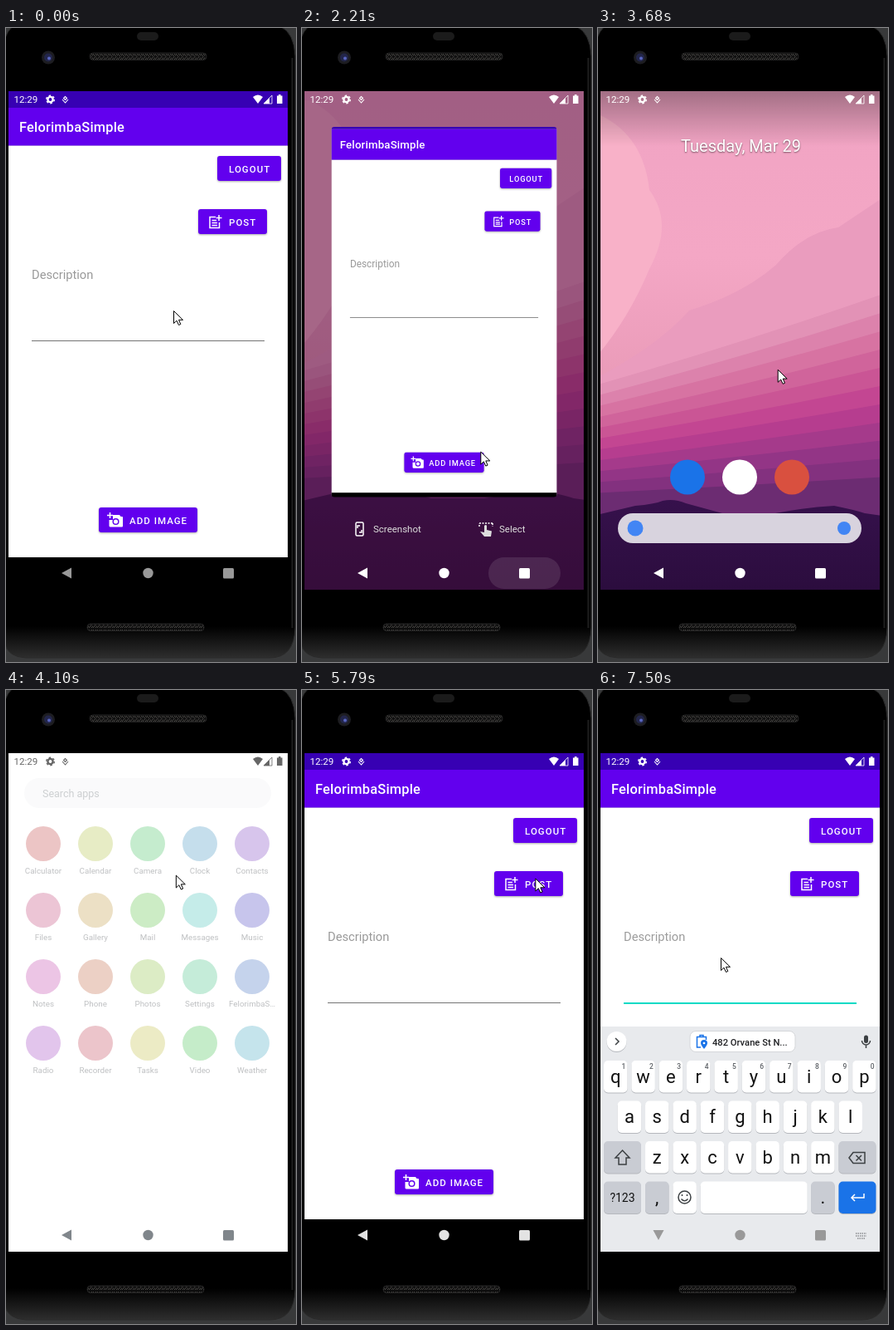
Write an HTML page that moves like this. It is 350 px wide and 763 px high and loops after 8 s.

```html
<!DOCTYPE html>
<html lang="en">
<head>
<meta charset="utf-8">
<title>Phone demo</title>
<style>
  html, body { margin: 0; width: 100%; height: 100%; overflow: hidden; background: #000; }
  body { position: relative; font-family: Roboto, sans-serif; }
  svg { position: absolute; display: block; }
  .stage { left: 0; top: 0; width: 350px; height: 763px; }
  #screen { position: absolute; left: 3px; top: 76px; width: 337px; height: 600px; overflow: hidden; background: #000; }
  #screen > svg { left: 0; top: 0; width: 337px; height: 600px; transform-origin: 0 0; }
  #wall { overflow: visible; }
  .btn { fill: #6200ee; filter: drop-shadow(0 1px 1px #0005); }
  .btnText { fill: #fff; font-size: 11.5px; font-weight: 500; letter-spacing: 1.03px; }
  .line { fill: none; stroke: #fff; stroke-width: 1.5; }
  .dark { fill: none; stroke: #3c4043; stroke-width: 1.5; }
  .ink { fill: currentColor; }
  .ring { fill: none; stroke: currentColor; }
  .mid { text-anchor: middle; }
  .key { filter: drop-shadow(0 1px 0 #b5b8bd); }
  #back { transform-box: fill-box; transform-origin: center; }

  /* All motion is paused and read off the clock in --t (ms). */
  .anim { animation: 8s linear calc(var(--t, 0) * -1ms) infinite paused; }

  #cursor { animation-name: cursor; }
  @keyframes cursor {
    0% { translate: 202px 340px; }
    5%, 10% { translate: 185px 298px; }
    14.8% { translate: 193px 627px; }
    18.1% { translate: 169px 671px; }
    21.4% { translate: 247px 656px; }
    24.7% { translate: 260px 652px; }
    27.9% { translate: 216px 513px; }
    36.2% { translate: 125px 82px; }
    42.8%, 44.4% { translate: 223px 434px; }
    46% { translate: 217px 414px; }
    50% { translate: 195px 200px; }
    57.5%, 60.5% { translate: 269px 370px; }
    64.1% { translate: 245px 423px; }
    70.7% { translate: 280px 209px; }
    75.7% { translate: 284px 261px; }
    79% { translate: 230px 480px; }
    82.2% { translate: 211px 500px; }
    83.9% { translate: 155px 342px; }
    85.5%, 100% { translate: 148px 322px; }
  }

  #app { animation-name: app; }
  @keyframes app {
    0%, 22.4%, 66.6%, 100% { transform: none; clip-path: inset(0); }
    22.5% { transform: translate(6px, 6px) scale(.965); }
    27.9% { transform: translate(32px, 29.6px) scale(.81); }
    29.6% { transform: translate(39px, 30px) scale(.772); }
    34.5%, 66.5% { transform: translate(39px, -460px) scale(.772); }
    22.5%, 66.5% { clip-path: inset(16.5px 0 32.4px round 5px); }
  }

  #wall { animation-name: zoom; }
  @keyframes zoom {
    0%, 36.3% { transform: translate(6px, -18px); }
    42.7%, 100% { transform: none; }
  }
  #dim { animation-name: dim; }
  @keyframes dim { 0%, 36.3% { opacity: .46; } 42.7%, 100% { opacity: 0; } }
  #home { animation-name: home; }
  @keyframes home { 0%, 38% { opacity: 0; } 42.7%, 46.5% { opacity: 1; } 49%, 100% { opacity: 0; } }
  #actions { animation-name: actions; }
  @keyframes actions { 0%, 24.7% { opacity: 0; } 27.9%, 28.5% { opacity: 1; } 29%, 100% { opacity: 0; } }
  #ripple { animation-name: ripple; }
  @keyframes ripple { 0%, 22.4% { opacity: 0; } 22.5% { opacity: .14; } 28.5% { opacity: .1; } 29%, 100% { opacity: 0; } }

  #drawer { animation-name: drawer; }
  @keyframes drawer {
    0%, 46.5% { transform: translateY(600px); animation-timing-function: ease-out; }
    51%, 66.5% { transform: none; }
    66.6%, 100% { transform: translateY(600px); }
  }
  #apps { animation-name: apps; }
  @keyframes apps { 0%, 49% { opacity: 0; } 54%, 100% { opacity: 1; } }
  #launch { animation-name: launch; }
  @keyframes launch {
    0%, 60% { transform: translate(262px, 235px) scale(.1); opacity: 0; }
    60.1% { transform: translate(220px, 200px) scale(.25); opacity: 1; }
    64.1% { transform: translate(3px, 4px) scale(.982); }
    65.8%, 100% { transform: none; opacity: 1; }
  }

  #status { animation-name: status; }
  @keyframes status {
    0%, 49% { color: #fff; }
    51%, 60.8% { color: #666; }
    64.1% { color: #e0dff0; }
    65.8%, 100% { color: #fff; }
  }
  #nav { animation-name: nav; }
  @keyframes nav {
    0%, 22.4% { color: #999; }
    22.5%, 49% { color: #fff; }
    51%, 60.8% { color: #80868b; }
    64.1%, 71% { color: #eee; }
    82%, 100% { color: #999; }
  }

  #hint { animation-name: hint; }
  @keyframes hint { 0%, 86.4% { fill: #999; } 86.5%, 88% { fill: #757575; } 88.1%, 100% { fill: #9c9c9c; } }
  #focus { animation-name: focus; }
  @keyframes focus { 0%, 86.4% { opacity: 0; } 86.5%, 100% { opacity: 1; } }
  #caret { animation-name: caret; }
  @keyframes caret { 0%, 86.4% { opacity: 0; } 86.5%, 93% { opacity: 1; } 93.1%, 100% { opacity: 0; } }
  #keyboard { animation-name: rise; }
  @keyframes rise {
    0%, 88% { transform: translateY(271px); animation-timing-function: ease-out; }
    93.7%, 100% { transform: none; }
  }
  #back { animation-name: turn; }
  @keyframes turn { 0%, 89.5% { transform: none; } 89.6%, 100% { transform: rotate(-90deg); } }
</style>
</head>
<body>

<svg class="stage" viewBox="0 0 350 763">
  <defs>
    <linearGradient id="body" x2="0" y2="1">
      <stop offset="0"/><stop offset=".95"/><stop offset="1" stop-color="#2e2e2e"/>
    </linearGradient>
    <pattern id="mesh" width="5" height="9" y="30" patternUnits="userSpaceOnUse">
      <rect width="5" height="9" fill="#0d0d0d"/>
      <path d="M0 1L3 4.500L0 8M3 1L6 4.500L3 8" fill="none" stroke="#4a4846"/>
    </pattern>
  </defs>
  <rect width="350" height="763" fill="#38393a"/>
  <path d="M8 -2H331Q348 6 349 34V722Q348 758 318 758H24Q2 757 -2 740V14Q2 3 8 -2Z" fill="url(#body)" stroke="#2a2a2a"/>
  <path d="M345.500 36V722" stroke="#1e1e1e" stroke-width="2"/>
  <rect x="158" y="5" width="26" height="10" rx="5" fill="#1b1b1b"/>
  <circle cx="51" cy="35.500" r="8" fill="#1d1d21"/>
  <circle cx="51" cy="35.500" r="5" fill="#23264a"/>
  <circle cx="52" cy="36.500" r="2" fill="#5865c0"/>
  <rect x="101" y="30" width="141" height="8.500" rx="4" fill="url(#mesh)" stroke="#252525"/>
  <rect x="98" y="717" width="141" height="8.500" rx="4" fill="url(#mesh)" stroke="#252525"/>
</svg>

<div id="screen">
  <svg id="wall" class="anim" viewBox="3 76 337 600">
    <defs>
      <linearGradient id="sky" x2="0" y2="1">
        <stop offset="0" stop-color="#f0a3c3"/><stop offset=".5" stop-color="#f4a7c5"/>
        <stop offset="1" stop-color="#e595b2"/>
      </linearGradient>
      <linearGradient id="hill" x2="0" y2="1">
        <stop offset="0" stop-color="#36114c"/><stop offset="1" stop-color="#270b38"/>
      </linearGradient>
    </defs>
    <rect x="-10" y="50" width="360" height="450" fill="url(#sky)"/>
    <path d="M-10 105H3Q55 130 62 195Q92 235 62 290Q35 355 -10 405Z" fill="#f8b1c8"/>
    <path d="M-10 425Q70 385 110 340Q175 320 215 285Q250 245 290 240L350 200V450H-10Z" fill="#ea9cbe"/>
    <g id="bands"></g>
    <path d="M-10 588L45 575Q68 573 78 569Q92 566 106 572L150 584Q200 584 214 584Q250 577 285 575Q310 580 322 584L350 588V720H-10Z" fill="url(#hill)"/>
  </svg>

  <svg id="dim" class="anim" viewBox="3 76 337 600"><rect x="3" y="76" width="337" height="600" fill="#440e3a"/></svg>

  <svg id="home" class="anim" viewBox="3 76 337 600">
    <defs>
      <linearGradient id="shade" x2="0" y2="1">
        <stop offset="0" stop-opacity=".32"/><stop offset="1" stop-opacity="0"/>
      </linearGradient>
    </defs>
    <rect x="3" y="76" width="337" height="66" fill="url(#shade)"/>
    <text class="mid" x="172.500" y="149" font-size="20" fill="#fff" style="text-shadow:0 1px 2px #0008">Tuesday, Mar 29</text>
    <circle cx="108" cy="540.500" r="21" fill="#1a73e8"/>
    <circle cx="171" cy="540.500" r="21" fill="#fff"/>
    <circle cx="234" cy="540.500" r="21" fill="#d9503f"/>
    <rect x="24" y="584" width="294" height="36" rx="18" fill="#d8d3de"/>
    <circle cx="45" cy="602" r="9.500" fill="#4285f4"/>
    <circle cx="297" cy="602" r="8" fill="#4285f4"/>
  </svg>

  <svg id="drawer" class="anim" viewBox="3 76 337 600">
    <rect x="3" y="76" width="337" height="620" fill="#fff"/>
    <g id="apps" class="anim">
      <rect x="22" y="106" width="298" height="36" rx="18" fill="#f1f3f4"/>
      <text x="44" y="128.500" font-size="12.500" fill="#80868b">Search apps</text>
      <g id="grid"></g>
    </g>
  </svg>

  <svg id="actions" class="anim" viewBox="3 76 337 600" fill="#ddd" font-size="11.500">
    <rect x="65" y="595" width="9" height="16" rx="1.500" class="line"/>
    <path d="M67 602V599H70M72 604V607H69" class="line"/>
    <text x="86" y="607">Screenshot</text>
    <path d="M214 596H230M214 600V596M230 596V600" class="line" stroke-dasharray="2 1.500"/>
    <path d="M220 599Q222 597 223 599V604L229 605.500L228 612H220L215 606L220 607Z"/>
    <text x="238" y="607">Select</text>
  </svg>

  <svg id="launch" class="anim" viewBox="3 76 337 600">
    <rect x="3" y="76" width="337" height="600" fill="#fff"/>
    <rect x="3" y="76" width="337" height="20" fill="#3700b3"/>
    <rect x="3" y="637" width="337" height="39"/>
  </svg>

  <svg id="app" class="anim" viewBox="3 76 337 600">
    <rect x="3" y="76" width="337" height="600" fill="#fff"/>
    <rect x="3" y="96" width="337" height="45.500" fill="#6200ee" style="filter:drop-shadow(0 .5px .5px #0005)"/>
    <rect x="3" y="76" width="337" height="20" fill="#3700b3"/>
    <rect x="3" y="637" width="337" height="39"/>
    <text x="16" y="125" font-size="16.400" font-weight="500" letter-spacing=".2" fill="#fff">FelorimbaSimple</text>

    <rect class="btn" x="255" y="154" width="77" height="30" rx="3"/>
    <text class="btnText" x="269" y="174">LOGOUT</text>

    <rect class="btn" x="232" y="218" width="83" height="30" rx="3"/>
    <path class="line" d="M253 227.500H246V240.500H257.500V234M248.500 231.500H254M248.500 234.500H255M248.500 237.500H255M257 225V232M253.500 228.500H260.500"/>
    <text class="btnText" x="269" y="238">POST</text>

    <text id="hint" class="anim" x="31" y="302" font-size="14.700">Description</text>
    <rect x="31" y="376" width="281" height="1" fill="#737373"/>
    <rect id="focus" class="anim" x="31" y="376" width="281" height="2" fill="#03dac5"/>
    <rect id="caret" class="anim" x="31" y="287" width="1" height="19" fill="#555"/>

    <rect class="btn" x="112" y="577" width="119" height="30" rx="3"/>
    <path d="M129 586H137L138.500 588H140Q141 588 141 589V599Q141 600.500 140 600.500H126Q124.500 600.500 124.500 599V592H129Z" fill="#fff"/>
    <circle cx="132.500" cy="594" r="3.300" fill="#fff" stroke="#6200ee" stroke-width="1.500"/>
    <path class="line" d="M125.500 583V590M122 586.500H129"/>
    <text class="btnText" x="149" y="597">ADD IMAGE</text>
  </svg>

  <svg id="keyboard" class="anim" viewBox="3 76 337 600">
    <rect x="3" y="405" width="337" height="271" fill="#e8eaed"/>
    <circle class="key" cx="22.500" cy="423" r="12" fill="#fff"/>
    <path class="dark" d="M21 419L25 423L21 427"/>
    <rect x="111" y="410.500" width="127" height="25" rx="7" fill="#fff" stroke="#d5d7da"/>
    <path d="M124 430H119.500V417.500H130.500V421M123 417.500V415.500H127V417.500" class="line" style="stroke:#1a73e8"/>
    <path d="M128 432Q124 427 124 425A4 4 0 0 1 132 425Q132 427 128 432Z" fill="#1a73e8"/>
    <circle cx="128" cy="425" r="1.300" fill="#fff"/>
    <text x="138" y="428" font-size="11.200" font-weight="500" fill="#202124">482 Orvane St N...</text>
    <rect x="321" y="415.500" width="5" height="9.500" rx="2.500" fill="#3c4043"/>
    <path class="dark" d="M318.500 422A5 5 0 0 0 328.500 422M323.500 427V431"/>
    <g id="keys"></g>
    <path class="dark" d="M29.500 554L38 563H34V571H25V563H21Z"/>
    <path class="dark" d="M303 563L308 556.500H322V569.500H308ZM311.500 560L318 566.500M318 560L311.500 566.500"/>
    <g class="dark"><circle cx="104.500" cy="610.500" r="7.500"/><path d="M100.500 612.500Q104.500 617 108.500 612.500M101.500 607V609M107.500 607V609"/></g>
    <path class="line" d="M321 606V611H306M310 607L306 611L310 615"/>
    <path d="M311 654H324M311 657H324M313 660H322" stroke="#8a8d91" stroke-width="1.500" stroke-dasharray="1.500 1"/>
  </svg>

  <svg viewBox="3 76 337 600">
    <g id="status" class="anim ink">
      <text x="9.500" y="90" font-size="11.600">12:29</text>
      <circle class="ring" cx="53.500" cy="86" r="3.100" stroke-width="2.400"/>
      <circle class="ring" cx="53.500" cy="86" r="4.800" stroke-width="1.400" stroke-dasharray="2.500 2.530"/>
      <path class="ring" d="M68 86L71.500 90L75 86M71.500 82.500L69.500 84.500L71.500 86.500L73.500 84.500Z" stroke-width="1.100"/>
      <path d="M298 83Q304 78 310 83L304 91Z"/>
      <path d="M318 84V91H311Z"/><path class="ring" d="M321 81V91H311Z" stroke-width=".8"/>
      <path d="M327 81.500H329V80H331.500V81.500H333.500V91H327Z"/>
    </g>
    <rect id="ripple" class="anim" x="225" y="637" width="87" height="38" rx="19" fill="#fff"/>
    <g id="nav" class="anim ink">
      <path id="back" class="anim" d="M67 656L79 649.500V662.500Z"/>
      <circle cx="171.500" cy="656" r="6.200"/>
      <rect x="262" y="650" width="13" height="12.500" rx="1.500"/>
    </g>
  </svg>
</div>

<svg class="stage" viewBox="0 0 350 763">
  <path id="cursor" class="anim" d="M.5 .5V15.500L4 12.200L6.500 17.500L8.800 16.500L6.500 11.300H11.500Z" fill="#fff" stroke="#000"/>
</svg>

<script>
const fill = (id, html) => { document.getElementById(id).innerHTML = html; };
const repeat = (count, fn) => Array.from({ length: count }, (_, i) => fn(i)).join('');

// Cloud bands: flatter, darker and more violet towards the horizon
const BANDS = 11;
fill('bands', repeat(BANDS, i => {
  const p = i / (BANDS - 1), left = 432 + 128 * p, right = 318 + 222 * p;
  const bend = left * .55 + right * .45;
  return `<path d="M-10 ${left}Q170 ${bend} 350 ${right}V600H-10Z"
    fill="hsl(${333 - 38 * p * p} ${58 - 14 * p}% ${73 - 42 * p}%)"/>`;
}));

// App drawer grid
const names = ('Calculator Calendar Camera Clock Contacts Files Gallery Mail Messages Music ' +
  'Notes Phone Photos Settings FelorimbaS… Radio Recorder Tasks Video Weather').split(' ');
fill('grid', repeat(names.length, i => {
  const x = 45 + i % 5 * 63, y = 185 + Math.floor(i / 5) * 80;
  return `<circle cx="${x}" cy="${y}" r="21" fill="hsl(${i * 67 % 360} 50% 62%)"/>
    <text class="mid" x="${x}" y="${y + 36}" font-size="9.8" fill="#5f6368">${names[i]}</text>`;
}));

// Keyboard: rows and columns on a fixed pitch
const PITCH = 33.35, GREY = '#c9ccd3';
const rowY = r => 446 + r * 48.5;
const key = (r, x, w, label = '', color = '#fff', size = 22) =>
  `<rect class="key" x="${x}" y="${rowY(r)}" width="${w}" height="38.5" rx="5" fill="${color}"/>
   <text class="mid" x="${x + w / 2}" y="${rowY(r) + 19.5 + size * .33}" font-size="${size}" fill="#111">${label}</text>`;
const col = c => 7 + c * PITCH;
const small = (r, c, label, color) => key(r, col(c), 28.5, label, color);
const wide = (r, c, label, color) => key(r, col(c), 45, label, color, 14);
const letters = ['qwertyuiop', 'asdfghjkl', 'zxcvbnm'];
fill('keys',
  letters.map((row, r) => repeat(row.length, i => small(r, (10 - row.length) / 2 + i, row[i]))).join('') +
  repeat(10, i => `<text class="mid" x="${col(i) + 24}" y="456" font-size="8.5" font-weight="500" fill="#5f6368">${(i + 1) % 10}</text>`) +
  wide(2, 0, '', GREY) + wide(2, 8.5, '', GREY) +
  wide(3, 0, '?123', GREY) + small(3, 1.5, ',', GREY) + small(3, 2.5) + key(3, col(3.5), 129) +
  small(3, 7.5, '.', GREY) + wide(3, 8.5, '', '#1a73e8'));

// The clock advances in even ticks, like a low frame rate screen recording.
const LOOP = 8000, TICK = 131.6;
function run(now) {
  const tick = Math.floor(now % LOOP / TICK + .25);
  document.documentElement.style.setProperty('--t', tick * TICK);
  requestAnimationFrame(run);
}
run(0);
</script>
</body>
</html>
```
